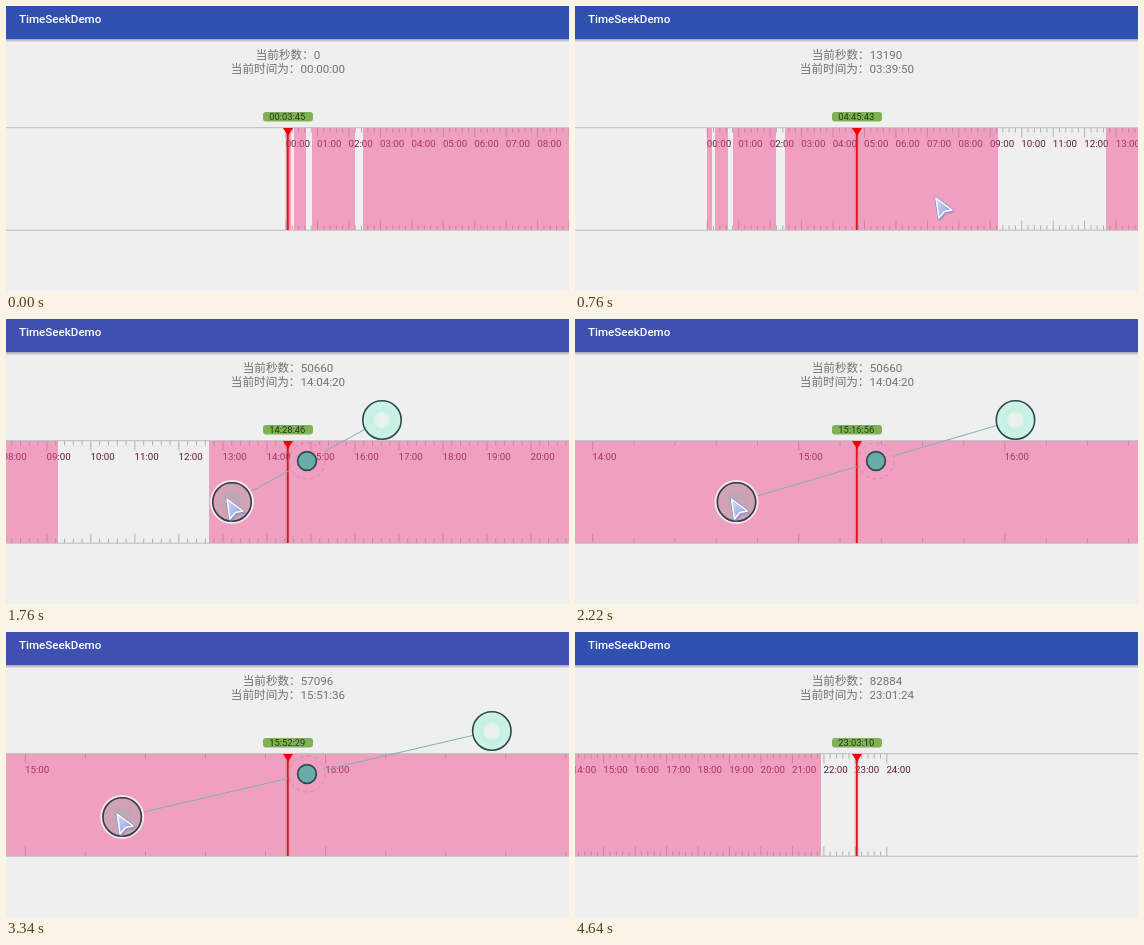
Write an HTML page that moves like this. It is 563 px wide and 285 px high and loops after 4660 ms.

```html
<!DOCTYPE html>
<html lang="zh-CN">
<head>
<meta charset="utf-8">
<title>TimeSeekDemo</title>
<style>
html, body { margin: 0; width: 100%; height: 100%; overflow: hidden; background: #efefef; }
svg { display: block; width: 563px; height: 285px; font-family: Roboto, "Noto Sans CJK SC", "Noto Sans CJK", sans-serif; }
.info { font-size: 11.6px; fill: #727272; text-anchor: middle; }
#labels { font-size: 9.75px; fill: #62183a; }
</style>
</head>
<body>
<svg viewBox="0 0 563 285">
  <defs>
    <linearGradient id="shade" x1="0" y1="0" x2="0" y2="1">
      <stop offset="0" stop-color="#a2a5b0"/><stop offset="1" stop-color="#efefef"/>
    </linearGradient>
    <linearGradient id="fill" x1="0" y1="0" x2="1" y2="1">
      <stop offset="0" stop-color="#d5def8"/><stop id="tint" offset="1"/>
    </linearGradient>
    <radialGradient id="mint">
      <stop offset="0" stop-color="#f0f2f0"/><stop offset=".35" stop-color="#e6f2ee"/>
      <stop offset=".5" stop-color="#c6f0e3"/><stop offset="1" stop-color="#cdf3e8"/>
    </radialGradient>
    <path id="shape" d="M0 0L16 12L8.5 13.5L2.9 20Z"/>
  </defs>
  <rect width="563" height="285" fill="#efefef"/>
  <rect y="33" width="563" height="3.5" fill="url(#shade)"/>
  <rect id="bar" width="563" height="33"/>
  <text x="13" y="17.3" font-size="11.6" font-weight="500" fill="#fff">TimeSeekDemo</text>
  <text id="secs" class="info" x="282" y="53.3"/>
  <text id="clock" class="info" x="282" y="66.8"/>

  <path id="ticks" fill="none" stroke="#b0b0b0"/>
  <g id="labels"></g>
  <path id="parts" fill="#f05090" fill-opacity=".5"/>
  <path d="M0 121.7H563M0 224.2H563" stroke="#bcbcbc"/>

  <rect x="257" y="106.1" width="50" height="9.4" rx="3" fill="#7fb254"/>
  <text id="badge" x="281.3" y="114.2" font-size="9.4" fill="#26351c" text-anchor="middle"/>
  <path d="M281.5 128V224" stroke="#c06060" stroke-opacity=".3" stroke-width="4"/>
  <path d="M281.8 128V224" stroke="#dc1420" stroke-width="1.7"/>
  <path d="M277 122H287L282 130Z" fill="#f00000"/>

  <g id="pinch">
    <path id="link" stroke="#86aeb2"/>
    <circle cx="301" cy="142" r="18" fill="none" stroke="#d487a8" stroke-width=".8" stroke-dasharray="4 3"/>
    <circle cx="301" cy="142" r="9.4" fill="#68abaa" stroke="#2f4a50" stroke-width="1.7"/>
    <g id="near">
      <circle r="21" fill="none" stroke="#f6e6ec" stroke-width="2"/>
      <circle r="19.2" fill="#cfa3b4" stroke="#303f48" stroke-width="1.6"/>
      <circle r="10" fill="#c3a6b6"/>
    </g>
    <circle id="far" r="19.2" fill="url(#mint)" stroke="#2f4a4e" stroke-width="1.6"/>
  </g>
  <g id="arrow" stroke-linejoin="round">
    <use href="#shape" x="1" y="1.5" fill="none" stroke="#7580b8" stroke-opacity=".4" stroke-width="3"/>
    <use href="#shape" fill="url(#fill)" stroke="#7f8cd0" stroke-width="2.8"/>
    <use href="#shape" fill="url(#fill)" stroke="#fff" stroke-width="1.5"/>
  </g>
</svg>
<script>
const LOOP = 4660, STEP = 20, MID = 282, WIDE = 471.5, NARROW = 31.45;
const HUB = { x: 301, y: 142 };
const SPANS = [[0, .16], [.26, .65], [.83, 2.2], [2.46, 9.25], [12.68, 21.91]]; // recorded hours

// Each stroke carries the ruler from sec0 to sec1; a pinch also changes the hour width.
const strokes = [];
let sec = 225, width = NARROW;

function drag(t0, t1, x0, y, sec1) {
  const x1 = x0 - (sec1 - sec) / 3600 * width;
  strokes.push({ t0, t1, x0, x1, y, sec0: sec, sec1, w0: width, w1: width });
  sec = sec1;
}
function pinch(t0, t1, x0, x1, y, sec1, w1) {
  strokes.push({ t0, t1, x0, x1, y, sec0: sec, sec1, w0: width, w1, pinch: true });
  sec = sec1;
  width = w1;
}

drag(160, 520, 470, 192, 28700);
drag(530, 640, 221, 192, 13190);
drag(668, 1099.4, 395.5, 192, 31727);
drag(1130, 1239.49, 368.7, 195, 50660);
pinch(1660, 2466.3, 235, 122, 180, 55457, WIDE);
drag(2640, 2740, 228, 183, 56080);
drag(2837, 3016, 147.2, 183, 57096);
pinch(3280, 3640, 85, 242, 182, 58400, NARROW);
drag(3700, 3860, 307.7, 184, 62482);
drag(3900, 3980, 272, 184, 72000);
drag(4060, 4160, 340, 186, 82884);
drag(4360, 4660, 245, 186, 82998);

const ENTRY = { t1: 20, x1: 420, y: 280 };
const $ = id => document.getElementById(id);
const put = (id, name, value) => $(id).setAttribute(name, value);
const show = (id, on) => put(id, "visibility", on ? "visible" : "hidden");
const two = n => String(n).padStart(2, "0");
const hms = s => [s / 3600, s / 60 % 60, s % 60].map(v => two(Math.floor(v))).join(":");
const mix = (a, b, p) => a + (b - a) * p;
const part = (t, a, b) => Math.min(1, Math.max(0, (t - a) / (b - a)));

const labels = Array.from({ length: 25 }, (_, h) => {
  const el = document.createElementNS("http://www.w3.org/2000/svg", "text");
  el.textContent = two(h) + ":00";
  el.setAttribute("y", 141);
  $("labels").append(el);
  return el;
});

function pose(t) {
  const i = strokes.findLastIndex(s => s.t0 <= t);
  const s = strokes[Math.max(i, 0)], p = part(t, s.t0, s.t1);
  const w = s.w0 * (s.w1 / s.w0) ** p;
  // zooming about a fixed focus moves the time with 1 / width
  const k = s.pinch ? (1 / s.w0 - 1 / w) / (1 / s.w0 - 1 / s.w1) : p;
  const out = {
    w, sec: mix(s.sec0, s.sec1, k),
    settled: p === 1 ? s.sec1 : i > 0 ? s.sec0 : 0,
    pinching: s.pinch && p < 1,
    x: mix(s.x0, s.x1, p), y: s.y
  };
  const from = i < 0 ? ENTRY : s, next = strokes[i + 1];
  if (next && t > from.t1) {
    const g = part(t, from.t1, next.t0);
    out.x = mix(from.x1, next.x0, g);
    out.y = mix(from.y, next.y, g);
  }
  return out;
}

function drawRuler(hour, w) {
  const at = h => MID + (h - hour) * w;
  let ticks = "";
  for (let i = 0; i <= 120; i++) {
    const x = at(i / 5), len = i % 5 ? 4.5 : 9.5;
    if (x > -2 && x < 565) ticks += `M${x.toFixed(2)} 122v${len}M${x.toFixed(2)} 224v${-len}`;
  }
  put("ticks", "d", ticks);
  labels.forEach((el, h) => el.setAttribute("x", (at(h) - .4).toFixed(2)));
  put("parts", "d", SPANS.map(([a, b]) => {
    const l = Math.max(-5, Math.round(at(a))), r = Math.min(568, Math.round(at(b)));
    return r > l ? `M${l} 122H${r}V224H${l}Z` : "";
  }).join(""));
}

function drawPointer(t, { x, y, pinching }) {
  put("arrow", "transform", `translate(${x} ${y})`);
  show("arrow", t >= ENTRY.t1 && t < 4360);
  put("tint", "stop-color", t >= 1140 && t < 1300 ? "#86c4fa" : "#8494dc");

  show("pinch", pinching);
  const dx = x + 5 - HUB.x, dy = y + 3 - HUB.y, ring = 20 / Math.hypot(dx, dy);
  const spot = k => `${HUB.x + dx * k} ${HUB.y + dy * k}`;
  put("near", "transform", `translate(${spot(1)})`);
  put("far", "transform", `translate(${spot(-1)})`);
  put("link", "d", `M${spot(1)}L${spot(ring)}M${spot(-ring)}L${spot(-1)}`);
}

function render(ms) {
  const t = Math.floor(ms % LOOP / STEP) * STEP;
  const now = pose(t);
  put("bar", "fill", now.pinching ? "#4050b0" : "#3050af");
  drawRuler(now.sec / 3600, now.w);
  drawPointer(t, now);
  $("secs").textContent = "当前秒数\uff1a" + now.settled;
  $("clock").textContent = "当前时间为\uff1a" + hms(now.settled);
  $("badge").textContent = hms(Math.round(now.sec));
}

let start;
function loop(now) {
  start ??= now;
  render(now - start);
  requestAnimationFrame(loop);
}
render(0);
requestAnimationFrame(loop);
</script>
</body>
</html>
```
